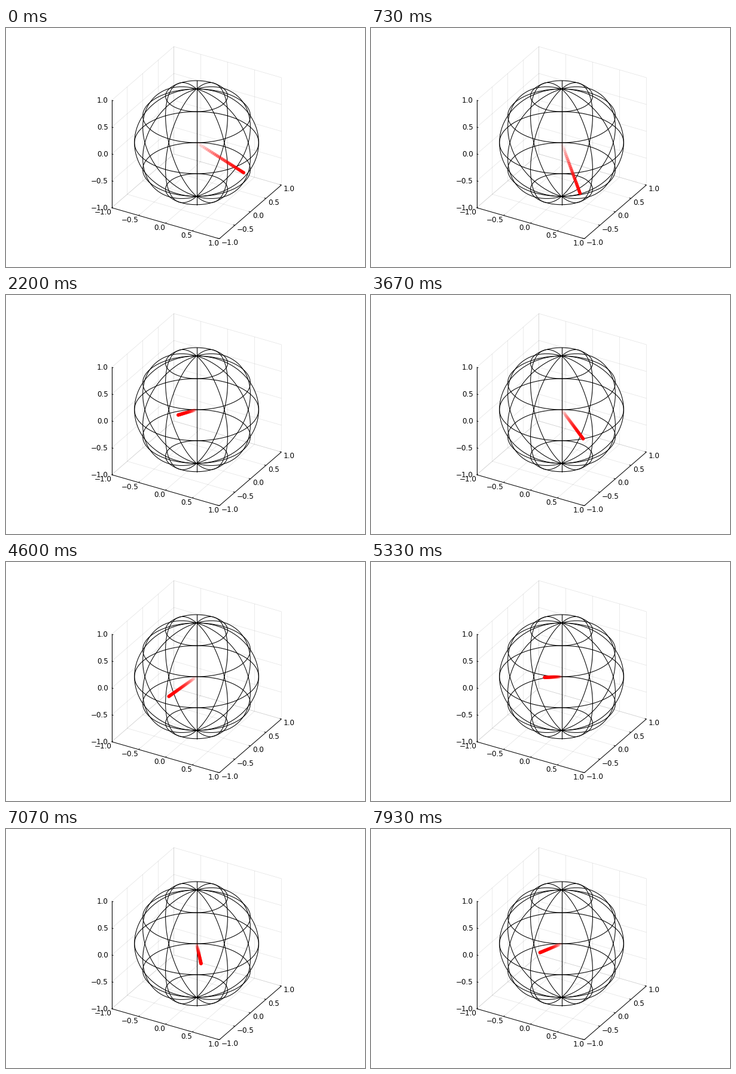
A matplotlib script that plays this animation: 600x400 px, repeating every 8000 ms.

```python
import numpy as np
import matplotlib.pyplot as plt
from matplotlib.animation import FuncAnimation
from matplotlib.collections import LineCollection

W, H, DPI = 600, 400, 100
FPS, FRAMES = 15, 120
PX = 72 / DPI                      # points per pixel

CENTER = np.array([318.5, 191.9])
SCALE = 103.8
C30, S30 = np.cos(np.pi / 6), 0.5

# Precessing, relaxing state vector
RHO0, Z0, PHASE0 = 0.77, -0.64, 0.71
OMEGA, GAMMA = 2.0, 0.1
DOTS = 30


def project(x, y, z):
    """Orthographic view, azimuth 30 and elevation 30 degrees."""
    x, y, z = np.broadcast_arrays(x, y, z)
    u = x * C30 + y * S30
    v = (x * S30 - y * C30) * S30 - z * C30
    return CENTER + SCALE * np.stack([u, v], axis=-1)


def polyline(*points):
    return project(*np.array(points, float).T)


fig = plt.figure(figsize=(W / DPI, H / DPI), dpi=DPI, facecolor="white")
ax = fig.add_axes([0, 0, 1, 1])
ax.set_xlim(0, W)
ax.set_ylim(H, 0)
ax.axis("off")


def add_lines(lines, width, alpha=1.0, zorder=1):
    ax.add_collection(LineCollection(lines, colors=[(0, 0, 0, alpha)],
                                     linewidths=width * PX, zorder=zorder))


def label(pos, dx, dy, value, align):
    text = f"{value:.1f}".replace("-", "\u2212")
    ax.text(pos[0] + dx, pos[1] + dy + 4.4, text, ha=align, va="baseline",
            fontsize=12 * PX, family="DejaVu Sans", color="black", zorder=3)


def draw_box():
    ticks = np.linspace(-1, 1, 5)
    tick = -1 + 0.03
    grid, marks = [], []
    for t in ticks:
        grid += [polyline((t, -1, -1), (t, 1, -1), (t, 1, 1)),
                 polyline((1, t, -1), (-1, t, -1), (-1, t, 1)),
                 polyline((-1, -1, t), (-1, 1, t), (1, 1, t))]
        marks += [polyline((t, -1, -1), (t, tick, -1)),
                  polyline((1, t, -1), (-tick, t, -1)),
                  polyline((-1, -1, t), (tick, -1, t))]
        label(project(t, -1, -1), -0.2, 7.3, t, "right")
        label(project(1, t, -1), 3.7, 6.0, t, "left")
        label(project(-1, -1, t), -5.9, 0, t, "right")
    add_lines(grid, 0.8, alpha=0.1)
    axes = [polyline((-1, -1, -1), (1, -1, -1)),
            polyline((1, -1, -1), (1, 1, -1)),
            polyline((-1, -1, -1), (-1, -1, 1))]
    add_lines(axes + marks, 1.0, zorder=2)


def draw_sphere():
    a = np.linspace(0, 2 * np.pi, 91)
    rings = []
    for lat in np.radians([-60, -30, 0, 30, 60]):
        r = np.cos(lat)
        rings.append(project(r * np.cos(a), r * np.sin(a), np.sin(lat)))
    for lon in np.radians(np.arange(0, 180, 30)):
        rings.append(project(np.cos(a) * np.cos(lon),
                             np.cos(a) * np.sin(lon), np.sin(a)))
    add_lines(rings, 1.05, zorder=2)


def state(t):
    rho = RHO0 * np.exp(-GAMMA * t)
    ang = PHASE0 - OMEGA * t
    return rho * np.cos(ang), rho * np.sin(ang), Z0 * np.exp(-2 * GAMMA * t)


def trail(t):
    k = np.linspace(0, 1, DOTS)
    x, y, z = state(t)
    return project(k * x, k * y, k * z)


draw_box()
draw_sphere()
colors = np.zeros((DOTS, 4))
colors[:, 0] = 1
colors[:, 3] = np.linspace(0, 1, DOTS)
start = trail(0)
dots = ax.scatter(start[:, 0], start[:, 1], s=(5.8 * PX) ** 2, c=colors,
                  linewidths=0, zorder=4)


def update(i):
    dots.set_offsets(trail(i / FPS))
    return (dots,)


anim = FuncAnimation(fig, update, frames=FRAMES, interval=1000 / FPS,
                     repeat=True, repeat_delay=0, blit=False)
plt.show()
```
